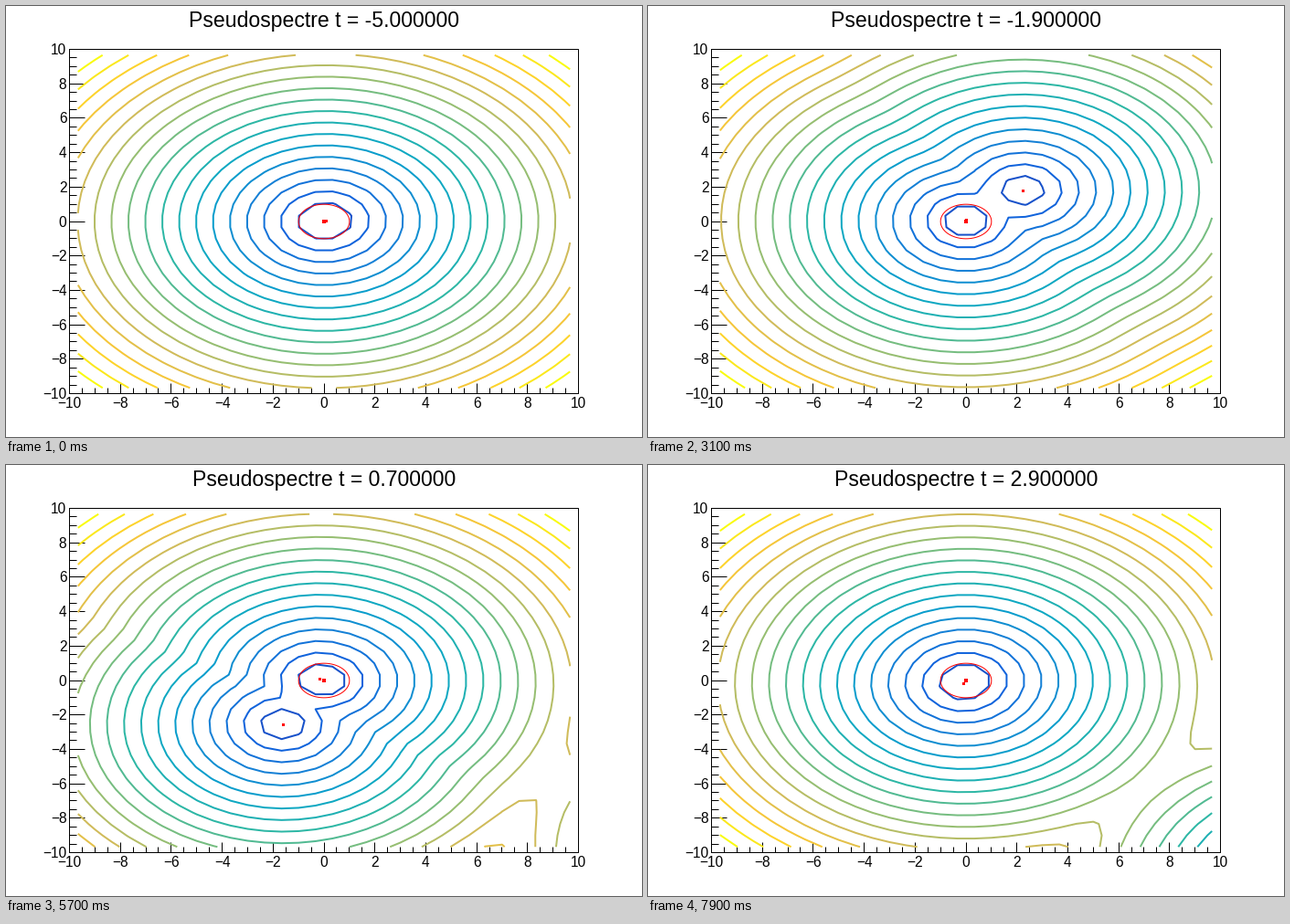
Write a matplotlib script that moves like this. It is 696 by 472 pixels and loops after 8000 ms.

```python
import numpy as np
import matplotlib.pyplot as plt
from matplotlib.animation import FuncAnimation
from matplotlib.colors import LinearSegmentedColormap

W, H, DPI = 696, 472, 100
FRAMES, INTERVAL = 80, 100
LEFT, RIGHT, TOP, BOTTOM = 69.5, 626.5, 47.5, 424.5
BINS, LEVELS = 30, 20
FONT = "Liberation Sans"

BIRD = LinearSegmentedColormap.from_list("bird", [
    "#352a87", "#0f5cdd", "#1481d6", "#06a4ca", "#2eb7a4",
    "#87bf77", "#d1bb59", "#fec832", "#f9fb0e"])
COLORS = [BIRD((i + 0.99) / LEVELS) for i in range(1, LEVELS)]


def px(x):
    return (LEFT + RIGHT) / 2 + np.asarray(x) * (RIGHT - LEFT) / 20


def py(y):
    return (TOP + BOTTOM) / 2 - np.asarray(y) * (BOTTOM - TOP) / 20


def pt(pixels):
    return pixels * 72 / DPI


def sigmoid(x):
    return 1 / (1 + np.exp(-x))


def bump(t, center):
    return np.exp(-(t - center) ** 2)


def polar(r, phase):
    return r * np.exp(1j * phase)


def eigenvalues(t):
    # grows, swings clockwise and settles outside the view
    outer = polar((18.7 + 2.5 * bump(t, 0.5)) * sigmoid(8.8 * (t + 0.2)) ** 0.125,
                  0.68 - 1.39 * sigmoid(3.6 * (t - 0.18)))
    # shoots up, swings round and decays
    middle = polar(7.25 * np.exp(-1.25 * t) * sigmoid(4.5 * (t + 0.43)),
                   1.63 + 2.56 * sigmoid(8 * (t - 0.2)))
    # short excursion to the left
    inner = polar(bump(t, -0.3) ** 1.7, 3.33 - 0.66 * (t + 0.3))
    return np.array([0, inner, middle, outer])


def sigma_min(z, eig, t):
    """Smallest singular value of T - z for a slightly non-normal T."""
    coupling = 0.05 + 0.07 * bump(t, -0.5)
    T = np.diag(eig)
    T[:3, 3] = coupling * abs(eig[3])
    shifted = T - z[..., None, None] * np.eye(4)
    return np.linalg.svd(shifted, compute_uv=False)[..., -1]


fig = plt.figure(figsize=(W / DPI, H / DPI), dpi=DPI, facecolor="white")
ax = fig.add_axes([0, 0, 1, 1])
ax.axis("off")
ax.set_xlim(0, W)
ax.set_ylim(H, 0)
ax.set_autoscale_on(False)


def stroke(xs, ys, color="black", z=2):
    ax.plot(xs, ys, color=color, lw=pt(1), snap=False, zorder=z,
            solid_capstyle="butt", solid_joinstyle="miter")


def label(x, y, s, size, ha):
    return ax.text(x, y, s, fontsize=pt(size), family=FONT, ha=ha,
                   va="baseline", color="black")


stroke([LEFT, RIGHT, RIGHT, LEFT, LEFT], [TOP, TOP, BOTTOM, BOTTOM, TOP])
for i in range(41):
    v = -10 + i / 2
    major = i % 4 == 0
    x, y = np.floor(px(v)) + 0.5, np.floor(py(v)) + 0.5
    stroke([x, x], [BOTTOM, BOTTOM - (11 if major else 6)])
    stroke([LEFT, LEFT + (17 if major else 8)], [y, y])
    if major:
        text = f"{v:.0f}".replace("-", "\u2212")
        label(px(v), 440.5, text, 15.5, "center")
        label(66.5, py(v) + 5.5, text, 15.5, "right")

angle = np.linspace(0, 2 * np.pi, 80)
stroke(px(np.cos(angle)), py(np.sin(angle)), "red", 4)
ax.scatter([px(0)], [py(0)], s=pt(4) ** 2, marker="s", c="red", lw=0, zorder=5)
dots = ax.scatter([], [], s=pt(3) ** 2, marker="s", c="red", lw=0, zorder=5)
title = label(348, 23, "", 23, "center")

centers = -10 + (np.arange(BINS) + 0.5) * 20 / BINS
X, Y = np.meshgrid(centers, centers)
TIMES = np.cumsum([-5.0] + [0.1] * (FRAMES - 1))
drawn = []


def update(n):
    t = TIMES[n]
    eig = eigenvalues(t)
    field = sigma_min(X + 1j * Y, eig, t)
    low, high = field.min(), field.max()
    levels = low + (high - low) * np.arange(1, LEVELS) / LEVELS
    while drawn:
        drawn.pop().remove()
    drawn.append(ax.contour(px(X), py(Y), field, levels=levels, colors=COLORS,
                            linewidths=pt(2), zorder=3))
    shown = eig[(abs(eig.real) < 10) & (abs(eig.imag) < 10)]
    dots.set_offsets(np.column_stack([px(shown.real), py(shown.imag)]))
    title.set_text(f"Pseudospectre t = {t:.6f}")
    return [title, dots]


anim = FuncAnimation(fig, update, frames=FRAMES, interval=INTERVAL,
                     init_func=lambda: update(0), repeat=True,
                     repeat_delay=0, blit=False)
plt.show()
```
